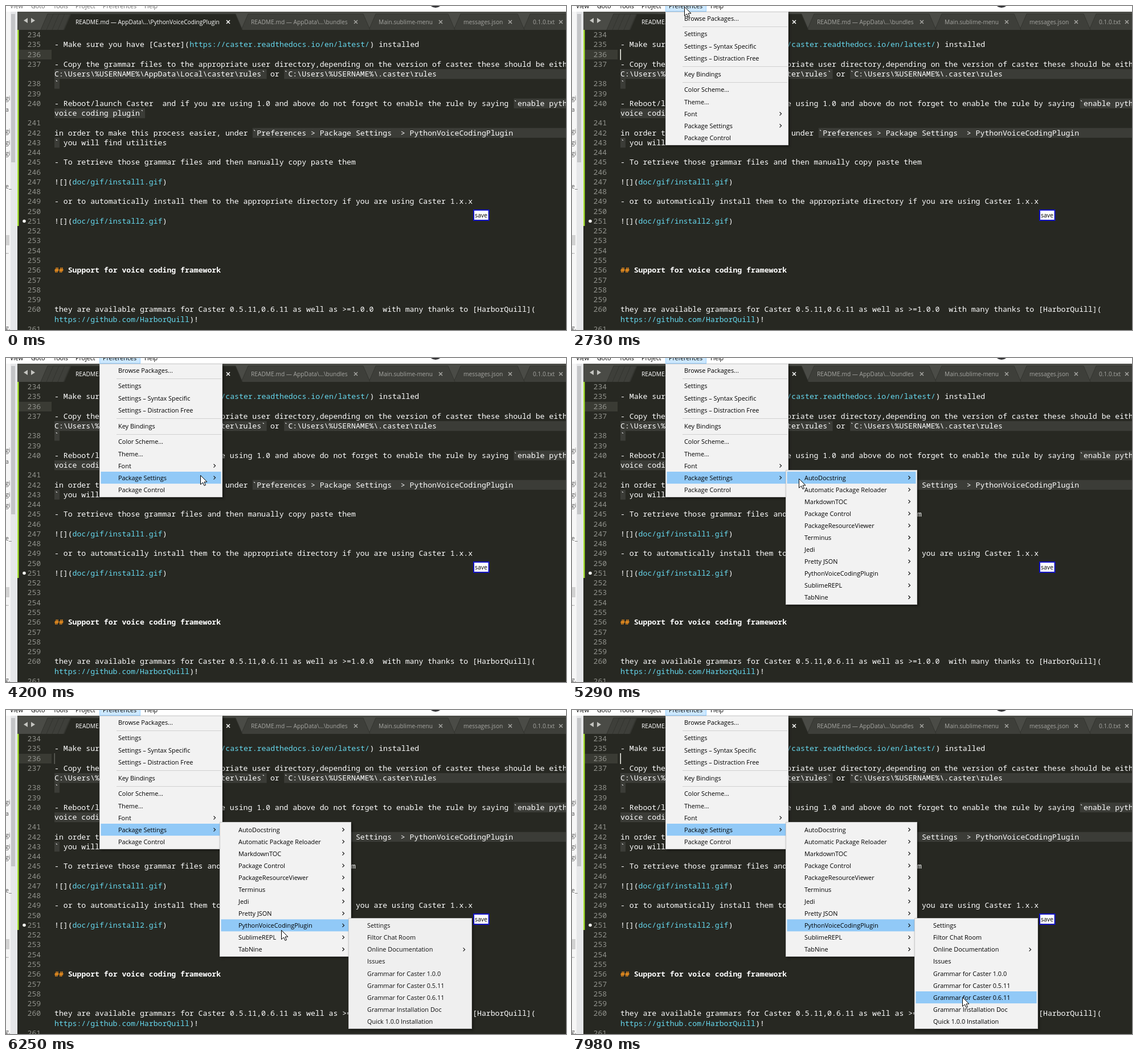
An HTML page with a canvas for the animation above (8 s loop, 983 by 570 pixels).

```html
<!DOCTYPE html>
<html lang="en">
<head>
<meta charset="utf-8">
<title>Editor menu</title>
<style>
html, body { margin: 0; width: 100%; height: 100%; overflow: hidden; background: #272822; }
canvas { display: block; }
</style>
</head>
<body>
<canvas id="stage" width="983" height="570"></canvas>
<script>
const W = 983, H = 570, LOOP = 8000;
const CHAR = 7.906, ROW = 17.26, LEFT = 85;
const MONO = '13.177px "Noto Sans Mono", "DejaVu Sans Mono", monospace';
const ui = size => size + 'px "Open Sans", "Noto Sans", sans-serif';
const stage = document.getElementById('stage').getContext('2d');
const base = document.createElement('canvas');
base.width = W;
base.height = H;
let g = base.getContext('2d');

// "+" marks a wrapped row, "~" stands for a backtick
const rows = String.raw`
- Make sure you have [Caster](https://caster.readthedocs.io/en/latest/) installed

- Copy the grammar files to the appropriate user directory,depending on the version of caster these should be either ~
+C:\Users\%USERNAME%\AppData\Local\caster\rules~ or ~C:\Users\%USERNAME%\.caster\rules
~

- Reboot/launch Caster  and if you are using 1.0 and above do not forget to enable the rule by saying ~enable python
+voice coding plugin~

in order to make this process easier, under ~Preferences > Package Settings  > PythonVoiceCodingPlugin
~ you will find utilities

- To retrieve those grammar files and then manually copy paste them

![](doc/gif/install1.gif)

- or to automatically install them to the appropriate directory if you are using Caster 1.x.x

![](doc/gif/install2.gif)




## Support for voice coding framework



they are available grammars for Caster 0.5.11,0.6.11 as well as >=1.0.0  with many thanks to [HarborQuill](
+https://github.com/HarborQuill)!
`.split('\n');

function rect(x, y, w, h, color) {
  g.fillStyle = color;
  g.fillRect(x, y, w, h);
}

function text(s, x, y, color, font) {
  g.font = font;
  g.fillStyle = color;
  g.fillText(s, x, y);
}

function poly(points, color) {
  g.beginPath();
  points.forEach(([x, y]) => g.lineTo(x, y));
  g.closePath();
  g.fillStyle = color;
  g.fill();
}

function line(points, color, width = 1) {
  g.beginPath();
  points.forEach(([x, y]) => g.lineTo(x, y));
  g.strokeStyle = color;
  g.lineWidth = width;
  g.stroke();
}

function disc(x, y, r, color) {
  g.beginPath();
  g.arc(x, y, r, 0, 7);
  g.fillStyle = color;
  g.fill();
}

function drawCode() {
  let number = 234, raw = false;
  rows.forEach((row, i) => {
    const wrapped = row[0] === '+', y = 55 + i * ROW;
    const s = wrapped ? row.slice(1) : row;
    if (!wrapped) text(number++, 37.5, y, '#90918b', '500 ' + MONO);

    let start = raw ? 0 : -1;
    for (let c = 0; c < s.length; c++) {
      if (s[c] !== '~') continue;
      if (raw) rect(LEFT + start * CHAR, y - 13, (c + 1 - start) * CHAR + 1, ROW, '#3b3c37');
      raw = !raw;
      start = c;
    }
    if (raw) rect(LEFT + start * CHAR, y - 13, W, ROW, '#3b3c37');

    if (s.startsWith('##')) {
      text('##', LEFT, y, '#fd971f', 'bold ' + MONO);
      text(s.slice(3), LEFT + 3 * CHAR, y, '#fff', 'bold ' + MONO);
      return;
    }
    let x = LEFT;
    s.replaceAll('~', '`').split(/(https:[^)]*|doc\/[^)]*)/).forEach((part, k) => {
      text(part, x, y, k % 2 ? '#66d9ef' : '#fff', '500 ' + MONO);
      x += part.length * CHAR;
    });
  });
}

function drawTab(x0, x1, color) {
  const edge = [[x0 - 1, 42], [x0 + 11, 14], [x1 - 11, 14], [x1 + 1, 42]];
  poly(edge, color);
  line(edge, '#33342f');
}

function drawTabs() {
  rect(20, 10, W, 32, '#4a4b46');
  poly([[38, 21], [31, 25.5], [38, 30]], '#c4c4c0');
  poly([[44, 21], [51, 25.5], [44, 30]], '#c4c4c0');
  for (let x = 62; x < 103; x += 10) drawTab(x, x + 60, '#3e3f3a');
  const tabs = [
    [909, 1040, '0.1.0.txt', 974],
    [787, 909, 'messages.json', 885],
    [638, 787, 'Main.sublime-menu', 763],
    [414, 638, 'README.md — AppData\\...\\bundles', 614],
    [103, 414, 'README.md — AppData\\...\\PythonVoiceCodingPlugin', 390]
  ];
  tabs.forEach(([x0, x1, label, close], i) => {
    const active = i === 4, tone = active ? '#fff' : '#a5a5a1';
    drawTab(x0, x1, active ? '#272822' : '#3e3f3a');
    text(label, x0 + (active ? 19 : 16), 31.5, tone, ui(10.2));
    line([[close - 3, 25], [close + 3, 31]], tone, 1.5);
    line([[close + 3, 25], [close - 3, 31]], tone, 1.5);
  });
}

function drawSidebar() {
  rect(0, 10, 20, H, '#f6f6f6');
  rect(8, 10, 12, H, '#e6e7e9');
  rect(9, 14, 7, 261, '#c4c5c7');
  rect(0, 403, 6, 18, '#d2d2d2');
  [['gi', 166], ['a', 186], ['gi', 224], ['gi', 244], ['gi', 263],
   ['e_', 321], ['..', 436], ['g.', 570]].forEach(([s, y]) => text(s, -1, y, '#555', ui(10.5)));
}

function drawBase() {
  rect(0, 0, W, H, '#272822');
  rect(0, 0, W, 10, '#fff');
  drawSidebar();
  drawTabs();
  disc(754, -10, 13, '#333336');
  rect(22, 77, 58, 17, '#3a3b34');
  rect(20, 42, 2.5, 345, '#a6e22e');
  disc(32, 378.5, 2.8, '#f8f8f2');
  drawCode();
  rect(820, 358, 28.5, 20, '#1414c8');
  rect(822, 360, 24.5, 16, '#fff');
  text('save', 823, 372, '#000', ui(10.5));
}

// Menus: a label ending in ">" has a submenu, "-" is a separator
function menu(open, x, y, w, h, first, labels) {
  let cy = first;
  const items = [];
  labels.forEach(label => {
    if (label === '-') { items.push({ sep: cy - 6.5 }); cy += 6.9; return; }
    items.push({ label: label.replace('>', ''), sub: label.endsWith('>'), y: cy });
    cy += 21.05;
  });
  return { open, x, y, w, h, items };
}

const menus = [
  menu(2560, 164, 10, 216, 235, 21.5, ['Browse Packages...', '-', 'Settings',
    'Settings – Syntax Specific', 'Settings – Distraction Free', '-', 'Key Bindings', '-',
    'Color Scheme...', 'Theme...', 'Font>', 'Package Settings>', 'Package Control']),
  menu(4590, 375, 197, 231, 237, 210.5, ['AutoDocstring>', 'Automatic Package Reloader>',
    'MarkdownTOC>', 'Package Control>', 'PackageResourceViewer>', 'Terminus>', 'Jedi>',
    'Pretty JSON>', 'PythonVoiceCodingPlugin>', 'SublimeREPL>', 'TabNine>']),
  menu(6180, 601, 366, 217, 195, 379.3, ['Settings', 'Filtor Chat Room',
    'Online Documentation>', 'Issues', 'Grammar for Caster 1.0.0', 'Grammar for Caster 0.5.11',
    'Grammar for Caster 0.6.11', 'Grammar Installation Doc', 'Quick 1.0.0 Installation'])
];
const parents = ['Package Settings', 'PythonVoiceCodingPlugin'];

function drawMenu(m, t, hot) {
  g.globalAlpha = Math.min(1, 0.4 + (t - m.open) / 130);
  g.shadowColor = 'rgba(0,0,0,.45)';
  g.shadowBlur = 4;
  g.shadowOffsetX = g.shadowOffsetY = 2;
  rect(m.x, m.y, m.w, m.h, '#cccccc');
  g.shadowColor = 'transparent';
  rect(m.x + 1, m.y + 1, m.w - 2, m.h - 2, '#f2f2f2');
  m.items.forEach(it => {
    if (it.sep) { rect(m.x + 30, Math.round(it.sep), m.w - 32, 1, '#d0d0d0'); return; }
    if (it === hot) rect(m.x + 2.5, it.y - 10.6, m.w - 5, 21.1, '#91c9f7');
    text(it.label, m.x + 33, it.y + 4, '#000', ui(10.9));
    if (it.sub) {
      const x = m.x + m.w - 15.5;
      line([[x, it.y - 3], [x + 3, it.y], [x, it.y + 3]], '#111', 1.2);
    }
  });
  g.globalAlpha = 1;
}

// Pointer strokes: each is a list of [time, x, y]
const strokes = [
  [[140, 649, 356], [270, 532, 245]],
  [[440, 526, 243], [1080, 227, 11]],
  [[1460, 213, -8], [1710, 213, -8]],
  [[2330, 197, 1], [3030, 197, 1], [3340, 267, 103], [3890, 335, 185], [4200, 341, 206],
   [4770, 341, 206], [5290, 398, 212], [5610, 455, 354], [5860, 483, 387], [6490, 483, 387],
   [7350, 665, 391], [7980, 685, 505], [8000, 685, 505]]
];

function pointerAt(t) {
  const path = strokes.find(s => t >= s[0][0] && t < s[s.length - 1][0]);
  if (!path) return null;
  const i = path.findIndex(p => p[0] > t);
  const [t0, x0, y0] = path[i - 1], [t1, x1, y1] = path[i];
  const k = (t - t0) / (t1 - t0);
  return { x: Math.round(x0 + (x1 - x0) * k), y: Math.round(y0 + (y1 - y0) * k) };
}

function drawPointer({ x, y }) {
  const shape = [[0, 0], [0, 16], [4, 12.5], [6.5, 18], [9, 17], [6.5, 11.5], [11.5, 11.5], [0, 0]]
    .map(([dx, dy]) => [x + dx + 0.5, y + dy + 0.5]);
  poly(shape, '#fff');
  line(shape, '#000');
}

function caretAlpha(t) {
  if (t < 2560) return 0;
  const phase = (t - 2960 + 1100) % 1100;
  return Math.max(0, Math.min(1, (phase - 550) / 60, (1105 - phase) / 50));
}

function drawMenuBar(active) {
  if (active) {
    rect(164, 0, 72, 10, '#99d1ff');
    rect(165, 0, 70, 9, '#cce8ff');
  }
  [['View', 7], ['Goto', 44], ['Tools', 83], ['Project', 122], ['Preferences', 170], ['Help', 243]]
    .forEach(([s, x]) => text(s, x, 4, active ? '#000' : '#6d6d6d', ui(10.7)));
}

function draw(t) {
  g.drawImage(base, 0, 0);
  drawMenuBar(t >= 2560);
  g.globalAlpha = caretAlpha(t);
  rect(84.5, 76, 1.5, 19, '#f8f8f0');
  g.globalAlpha = 1;

  const p = pointerAt(t), shown = menus.filter(m => t >= m.open);
  const over = shown.findLastIndex(m => p.x >= m.x && p.x < m.x + m.w && p.y >= m.y && p.y < m.y + m.h);
  shown.forEach((m, i) => {
    const hot = i < shown.length - 1 && i !== over || i === 0 && shown.length > 1
      ? m.items.find(it => it.label === parents[i])
      : i === over && m.items.find(it => Math.abs(it.y - p.y) <= 10.5);
    drawMenu(m, t, hot);
  });
  if (p) drawPointer(p);
}

drawBase();
g = stage;
const begin = performance.now();
function tick() {
  draw((performance.now() - begin) % LOOP);
  requestAnimationFrame(tick);
}
tick();
</script>
</body>
</html>
```
